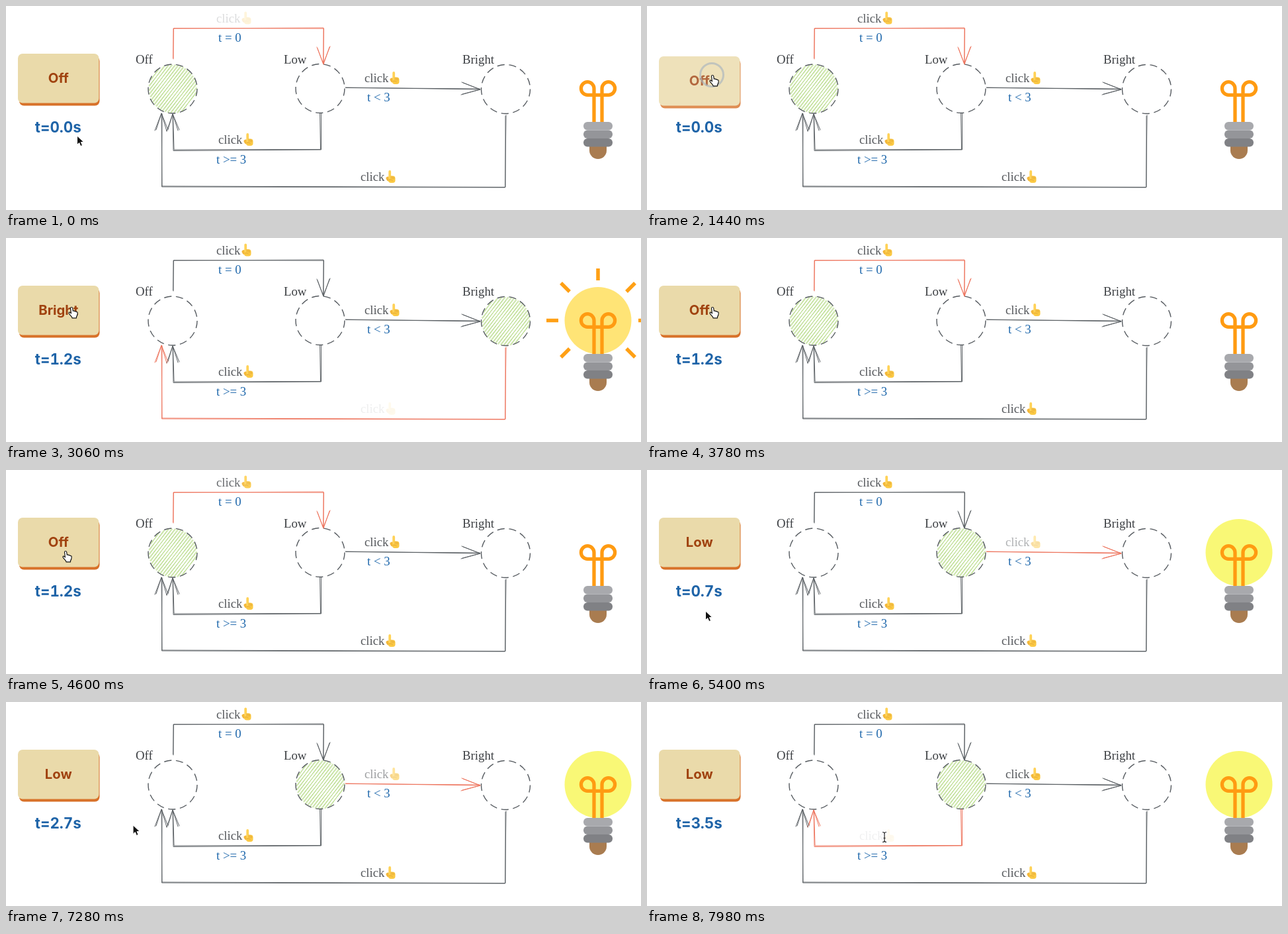
Animation, 960 px wide and 308 px high, one loop 8000 ms. Source, as an HTML page:

```html
<!DOCTYPE html>
<html lang="en">
<head>
<meta charset="utf-8">
<title>Lamp state machine</title>
<style>
  html, body { margin: 0; width: 100%; height: 100%; overflow: hidden; background: #fff; }
  svg { display: block; width: 960px; height: 308px; }
  .serif { font: 18.8px "Liberation Serif", serif; fill: #3c3f43; }
  .click { fill: #55585c; }
  .guard { fill: #1f68ac; }
  .ui { font-family: Inter, sans-serif; font-weight: 700; text-anchor: middle; }
  .line { fill: none; stroke-width: .95; stroke-linejoin: round; stroke-linecap: round; }
  .ring { fill: none; stroke: #565b60; stroke-width: 1.4; stroke-dasharray: 11.2 6.7; }
</style>
</head>
<body>
<svg viewBox="0 0 960 308">
  <defs>
    <g id="hand">
      <rect x="1.500" y="9.500" width="5" height="7" rx="2.500" fill="#f3b73a" transform="rotate(-28 4 13)"/>
      <rect x="4.500" y="8.500" width="10.500" height="10.500" rx="3.800" fill="#fbc944"/>
      <rect x="4.800" y="0" width="3.800" height="13" rx="1.900" fill="#ffd257"/>
      <path d="M8.600 9v3.500M10.900 9.500v3.500M13 10.500v2.500M5.500 14.500q3.500-1 5.500 1" fill="none" stroke="#e0a235" stroke-width=".8" stroke-linecap="round"/>
    </g>
  </defs>

  <g id="button">
    <rect x="20" y="76" width="121.500" height="74.500" rx="7" fill="#d8722a"/>
    <rect x="18" y="72" width="122.500" height="74.500" rx="7" fill="#eadaaa"/>
    <text id="caption" class="ui" x="79.300" y="115.500" font-size="20.300" fill="#a0420f"></text>
  </g>
  <text id="timer" class="ui" x="78.800" y="190.500" font-size="22.400" fill="#1f64a8" style="font-variant-numeric: tabular-nums"></text>

  <g id="diagram"></g>

  <g>
    <circle id="glass" cx="895" cy="124.500" r="50.500"/>
    <path id="rays" stroke="#ffa015" stroke-width="5.500" fill="none"
      d="M895 46v18M817 124.500h18M956 124.500h18M839 68l13 13M951 68l-13 13M839 180l13-13M951 180l-13-13"/>
    <path d="M889 177V124.500A9.800 9.800 0 1 0 879.500 134.300H911A9.800 9.800 0 1 0 901 124.500V177"
      fill="none" stroke="#ff9b12" stroke-width="5.300"/>
    <path d="M882 210h26v8a13 13 0 0 1 -26 0z" fill="#a97c50"/>
    <rect x="873" y="200" width="44" height="12.500" rx="6" fill="#808185"/>
    <rect x="873" y="187.500" width="44" height="12.500" rx="6" fill="#949599"/>
    <rect x="873" y="175" width="44" height="12.500" rx="6" fill="#a8a9ad"/>
  </g>

  <circle id="ripple" r="17.500" fill="none" stroke="#a9b5bf" stroke-width="3" opacity=".65"/>
  <g id="cursor">
    <path id="arrow" d="M.5 0v13.500l3.200-2.900 2.100 5 2.700-1.100-2.100-4.900h4.300z" fill="#111" stroke="#fff" stroke-width="1"/>
    <path id="pointer" transform="translate(1 1)" d="M-1.500 1q0-1.500 1.500-1.500t1.700 1.500l.6 4.200q1.800-.9 2.500.6 1.700-.8 2.300.8 2-.5 2.100 1.500 0 4-1.700 5.900v1.800h-6.500l-.4-1.500-4-4.700q-1.200-2 .2-2.400 1-.2 2.600 1.600z" fill="#fff" stroke="#151515" stroke-width="1.200" stroke-linejoin="round"/>
    <path id="beam" d="M-3-7.500q3 0 3 2 0-2 3-2M0-6v12M-3 7.500q3 0 3-2 0 2 3 2M-1.500 1.500h3" fill="none" stroke="#222" stroke-width="1.200"/>
  </g>
</svg>

<script>
const LOOP = 8000;
const RATE = 1.085;          // stopwatch milliseconds per playback millisecond
const PRESS = 130;
const DARK = '#5a5f64', RED = '#ee735c';
const CLICKS = [1500, 2640, 3780, 4735];
const NAMES = ['Off', 'Low', 'Bright'];

// time, x, y of the pointer's hot spot
const PATH = [
  [0, 107, 196], [600, 107, 196], [1150, 98, 104], [3850, 98, 104], [4500, 89, 122],
  [4800, 89, 122], [5250, 88, 213], [5800, 88, 213], [6450, 100, 176], [6900, 100, 176],
  [7850, 359, 204], [8000, 359, 204]
];

const byId = id => document.getElementById(id);
const diagram = byId('diagram');

function add(tag, attrs, parent = diagram) {
  const el = document.createElementNS('http://www.w3.org/2000/svg', tag);
  for (const key in attrs) el.setAttribute(key, attrs[key]);
  parent.append(el);
  return el;
}

function addText(text, x, y, cls = '', parent = diagram) {
  add('text', { x, y, class: 'serif ' + cls }, parent).textContent = text;
}

function addState(name, cx, cy, labelX) {
  const fill = add('g', {});
  let d = '';
  const angle = -0.9, ux = Math.cos(angle), uy = Math.sin(angle);
  for (let k = -35; k <= 35; k += 3.9) {
    const half = Math.sqrt(36.5 ** 2 - k * k);
    const at = (s, o) => `${cx - uy * (k + o) + ux * s} ${cy + ux * (k + o) + uy * s}`;
    d += `M${at(-half, 0)}L${at(half, 0.8)}M${at(-half, 1.3)}L${at(half, -0.6)}`;
  }
  add('path', { d, fill: 'none', stroke: '#b4da83', 'stroke-width': 0.9 }, fill);
  add('circle', { cx, cy, r: 37, class: 'ring' });
  addText(name, labelX, 87);
  return fill;
}

const states = [
  addState('Off', 252, 125, 196),
  addState('Low', 475, 124.5, 420),
  addState('Bright', 755.5, 125.5, 690)
];

function addArrow(d, echo, click, guard) {
  const line = add('path', { d: d + echo, class: 'line' });
  const label = add('g', {});
  const [x, y] = click;
  addText('click', x, y, 'click', label);
  add('use', { href: '#hand', x: x + 37.5, y: y - 16 }, label);
  if (guard) addText(...guard, 'guard');
  return { line, label };
}

const arrows = {
  start: addArrow('M253 80V34L480 33V88M470 62L480 88L489 62',
    'M252.500 79L253.500 33.500L480.500 34L479.500 87M471 64L479.500 87L490 61',
    [318, 24.5], ['t = 0', 321, 53.5]),
  boost: addArrow('M513 123L717 126M689 115L717 126L688 134',
    'M514 123.500L716 125M691 116L717 126L690 133',
    [542, 115], ['t < 3', 546, 144]),
  late: addArrow('M476.500 162V217L253 218.500L252 163M243 189L252 163L262 187',
    'M474.500 162L475.500 216.500L254 217L252.500 164M245 186L252 163L260 188',
    [321, 208], ['t >= 3', 318, 238]),
  reset: addArrow('M755 166V273.500L236 272L235 162M225 188L235 162L245 187',
    'M756 165L754.500 274L235.500 273L236 163M227 187L235 162L243 189',
    [536, 264])
};

function pointerAt(t) {
  const i = PATH.findIndex(p => p[0] > t);
  const [t0, x0, y0] = PATH[i - 1], [t1, x1, y1] = PATH[i];
  const p = (t - t0) / (t1 - t0), e = p * p * (3 - 2 * p);
  return [x0 + (x1 - x0) * e, y0 + (y1 - y0) * e];
}

const inside = (x, y, l, t, r, b) => x >= l && x <= r && y >= t && y <= b;
const show = (el, on) => el.setAttribute('visibility', on ? 'visible' : 'hidden');

function stopwatch(t) {
  if (t < CLICKS[0]) return 0;
  if (t >= CLICKS[3]) return (t - CLICKS[3]) * RATE / 1000;
  return (Math.min(t, CLICKS[1]) - CLICKS[0]) * RATE / 1000;
}

function render(t) {
  const count = CLICKS.filter(c => t >= c).length;
  const state = count % 3;
  const seconds = stopwatch(t);
  const active = state === 0 ? 'start' : state === 2 ? 'reset' : seconds < 3 ? 'boost' : 'late';
  const since = count ? (t - CLICKS[count - 1]) * RATE / 1000 : 0.38 + t * RATE / 1000;
  const pulse = 0.54 + 0.46 * Math.cos(2 * Math.PI * since);

  for (const key in arrows) {
    const on = key === active;
    arrows[key].line.setAttribute('stroke', on ? RED : DARK);
    arrows[key].label.setAttribute('opacity', on ? pulse : 1);
  }
  states.forEach((fill, i) => show(fill, i === state));

  byId('caption').textContent = NAMES[state];
  byId('timer').textContent = `t=${(Math.floor(seconds * 10) / 10).toFixed(1)}s`;
  show(byId('glass'), state > 0);
  byId('glass').setAttribute('fill', state === 2 ? '#ffe476' : '#f9f876');
  show(byId('rays'), state === 2);

  const pressed = CLICKS.some(c => t >= c - PRESS && t < c);
  byId('button').setAttribute('transform', `translate(0 ${pressed ? 4 : 0})`);
  byId('button').setAttribute('opacity', pressed ? 0.8 : 1);

  const [x, y] = pointerAt(t);
  const onButton = inside(x, y, 18, 72, 141, 150);
  const onText = inside(x, y, 43, 170, 114, 195) || inside(x, y, 321, 192, 376, 213);
  byId('cursor').setAttribute('transform', `translate(${x} ${y})`);
  byId('ripple').setAttribute('transform', `translate(${x} ${y})`);
  show(byId('ripple'), pressed);
  show(byId('pointer'), onButton);
  show(byId('beam'), onText);
  show(byId('arrow'), !onButton && !onText);
}

function tick() {
  render(performance.now() % LOOP);
  requestAnimationFrame(tick);
}
tick();
</script>
</body>
</html>
```
